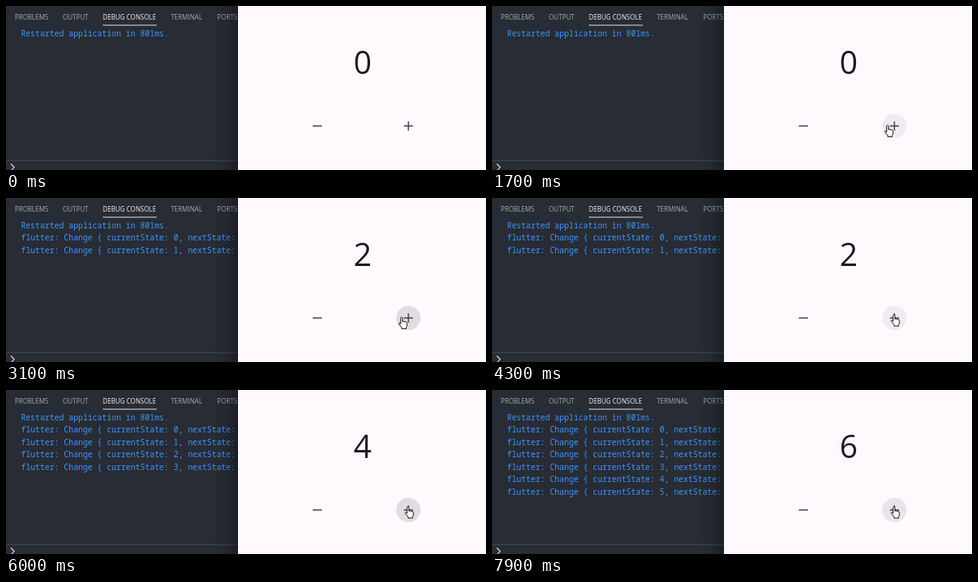
These frames come from a looping animation (600x205 px, 8000 ms). An HTML page:

```html
<!DOCTYPE html>
<html lang="en">
<head>
<meta charset="utf-8">
<title>Counter with debug console</title>
<style>
  html, body { margin: 0; width: 100%; height: 100%; overflow: hidden; background: #282c34; }
  svg { display: block; }
  .tabs { font: 8.15px "Open Sans", sans-serif; fill: #a8acb3; }
  .tabs .active { fill: #f4f4f4; }
  .log { font: 500 9.95px "Noto Sans Mono", monospace; fill: #3b95ff; white-space: pre; }
  .count { font: 39.5px "Open Sans", sans-serif; fill: #1d1b20; text-anchor: middle; }
  .icon { stroke: #45414b; stroke-width: 1.5; fill: none; }
  .cursor { fill: #fff; stroke: #111; stroke-width: 1; stroke-linejoin: round; }
</style>
</head>
<body>
<svg width="600" height="205" viewBox="0 0 600 205">
  <defs>
    <linearGradient id="shade">
      <stop offset="0" stop-opacity="0"/>
      <stop offset=".5" stop-opacity=".09"/>
      <stop offset="1" stop-opacity=".32"/>
    </linearGradient>
    <clipPath id="button"><circle cx="503" cy="150" r="15.3"/></clipPath>
  </defs>

  <rect width="600" height="205" fill="#282c34"/>
  <g class="tabs">
    <text x="11" y="16.8">PROBLEMS</text>
    <text x="71" y="16.8">OUTPUT</text>
    <text x="121" y="16.8" class="active">DEBUG CONSOLE</text>
    <text x="206" y="16.8">TERMINAL</text>
    <text x="264" y="16.8">PORTS</text>
  </g>
  <path d="M121 24H188.500" stroke="#e4e4e4"/>
  <g class="log" id="log"></g>
  <path d="M0 193.500H291" stroke="#42474f"/>
  <path d="M6 197.300L10.300 201.600L6 206" fill="none" stroke="#d0d3d8" stroke-width="1.3"/>
  <rect x="258" width="32" height="205" fill="url(#shade)"/>

  <rect x="290" width="310" height="205" fill="#fff9fe"/>
  <text class="count" id="count" x="445.700" y="84.500"></text>
  <g clip-path="url(#button)" fill="#49454f">
    <circle id="hover" cx="503" cy="150" r="15.3"/>
    <circle id="ripple" cy="150"/>
  </g>
  <path class="icon" d="M383.500 150H395M497.300 150H508.700M503 144.300V155.700"/>
  <g class="cursor" id="cursor">
    <path id="arrow" d="M0 0V12L2.800 9.500 4.600 13.600 6.400 12.800 4.700 8.900H8.400Z"/>
    <path id="hand" d="M3 9V1.800a1.200 1.200 0 0 1 2.400 0V6.200q.2-.9 1.100-.8 .9.100 1 1 .3-.6 1-.5 .9.100 1 1 .3-.4.700-.3 .7.200.700 1.200V10.500q0 1.500-1 2.700V14.800H4.400V13.300L1 9.200Q.4 8.200 1 7.700 1.800 7.200 2.400 8Z"/>
  </g>
</svg>
<script>
const LOOP = 8000, STEP = 100;
// Each click: start of the press and length of its ripple
const clicks = [[1700, 500], [2900, 700], [4700, 500], [5700, 500], [6700, 500], [7500, 500]];
const $ = id => document.getElementById(id);
const clamp = v => Math.min(1, Math.max(0, v));
const set = (id, attrs) => {
  for (const name in attrs) $(id).setAttribute(name, attrs[name]);
};

const messages = ["Restarted application in 801ms.",
  ...clicks.map((_, i) => `flutter: Change { currentState: ${i}, nextState:`)];
const lines = messages.map((message, i) => {
  const line = document.createElementNS("http://www.w3.org/2000/svg", "text");
  line.textContent = message;
  line.setAttribute("x", 18.7);
  line.setAttribute("y", 37.8 + i * 15.5);
  return $("log").appendChild(line);
});

function drawCursor(t) {
  const enter = clamp((t - 200) / 400);
  const shift = clamp((t - 4000) / 300);
  const x = 490.3 + 66 * (1 - enter) ** 2 + 8 * shift;
  const y = 148.6 - 3.3 * shift;
  const inside = x < 514;
  set("cursor", { transform: `translate(${x} ${y})`, visibility: t < 200 ? "hidden" : "visible" });
  set("arrow", { opacity: inside ? 0 : 1 });
  set("hand", { opacity: inside ? 1 : 0 });
  set("hover", { opacity: .08 * clamp((t - 300) / 300) });
  return x + 4;
}

function drawRipple(t, x) {
  const [start, length] = clicks.findLast(([at]) => at <= t) || [LOOP, 500];
  const age = t - start;
  const strength = age < 0 ? 0 : Math.min(clamp((age + 50) / 200), clamp((length - age) / 200));
  set("ripple", { cx: x, r: 6 + 24 * clamp(age / 200), opacity: .09 * strength });
}

function draw(now) {
  const t = Math.floor(now % LOOP / STEP) * STEP;
  const state = clicks.filter(([at]) => t >= at + 100).length;
  lines.forEach((line, i) => line.setAttribute("visibility", i <= state ? "visible" : "hidden"));
  $("count").textContent = state - state % 2; // rebuilt on even states only
  drawRipple(t, drawCursor(t));
  requestAnimationFrame(draw);
}
requestAnimationFrame(draw);
</script>
</body>
</html>
```
